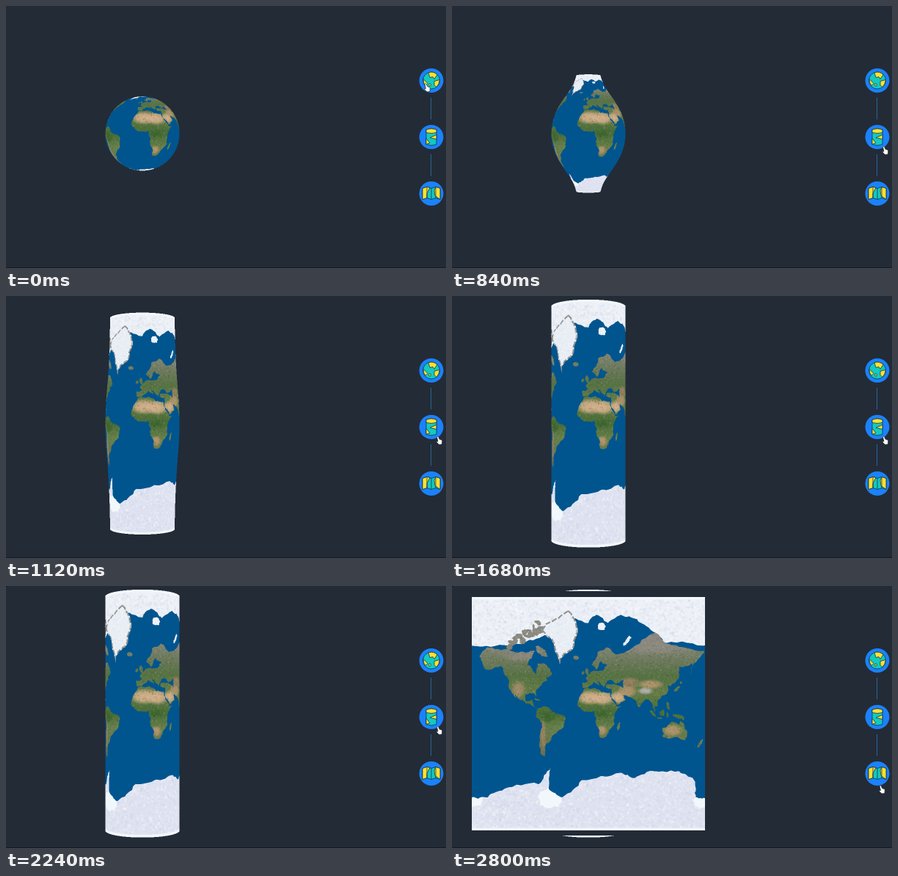
An HTML page with a canvas for the animation above (3.08 s loop, 600 px wide and 357 px high).

```html
<!DOCTYPE html>
<html lang="en">
<head>
<meta charset="utf-8">
<title>Globe, cylinder, map</title>
<style>
html, body { margin: 0; width: 100%; height: 100%; overflow: hidden; background: #232b37; }
canvas, svg { position: absolute; left: 0; top: 0; display: block; }
.ink { stroke: #15324a; stroke-width: .8; stroke-linejoin: round; }
.sea { fill: #14c9c0; }
.land { fill: #ffe12e; }
</style>
</head>
<body>
<canvas id="stage" width="600" height="357"></canvas>
<svg width="600" height="357">
  <rect y="356" width="600" height="1" fill="#141922"/>
  <rect id="dot" width="1" height="1"/>
  <path d="M579.5 125v29.5m0 47.5v29.5" stroke="#2a6595"/>
  <g class="ink" transform="translate(580 101.5)">
    <circle r="16.5" fill="#1a82fb" stroke="none"/>
    <circle class="sea" r="11.5"/>
    <path class="land" d="M-4-10.700Q3-13 8-8L4-2 2-5-2-4Z"/>
    <path class="land" d="M4 1 11.300-1Q11 5 7 9L4 6Z"/>
    <path class="land" d="M-11-2-5 4-8 7Q-11 4-11-2Z"/>
    <circle class="land" cx="-2" cy="6" r="1.5"/>
  </g>
  <g class="ink" transform="translate(580 178.5)">
    <circle r="16.5" fill="#1a82fb" stroke="none"/>
    <path class="sea" d="M-7-10V10Q0 13 7 10V-10Q0-13-7-10Z"/>
    <path class="land" d="M-7-10Q0-13 7-10V-6Q0-4-7-6Z"/>
    <path class="land" d="M7-3-2 1 7 3ZM-7 2-2 8-7 10Z"/>
  </g>
  <g class="ink" transform="translate(580 255.5)">
    <circle r="16.5" fill="#1a82fb" stroke="none"/>
    <path class="sea" d="M-12-7-6-9 0-7 6-9 12-7V8L6 6 0 8-6 6-12 8Z"/>
    <path class="land" d="M-12-7-6-9-2-8-6 0V6L-12 8Z"/>
    <path class="land" d="M12-7 6-9 4-4 5 3 12 8Z"/>
    <path fill="none" d="M-6-9V6M0-7V8M6-9V6"/>
  </g>
  <path id="hand" fill="#fff" stroke="#20242c" stroke-width=".7" stroke-linejoin="round"
    d="M2 1.600Q3.400 0 4.300 1.600L5.500 4.600 9.300 6 9 11.500 5 12 1 8 3.500 7.600Z"/>
</svg>
<script>
const STEP = 280, LOOP = 3080;
const T = 1272;                       // side of the Mercator texture
const R = 318 / (2 * Math.PI), CX = 186, CY = 173.8;
const CAM = 17;                       // camera distance in radii
const SS = 2;                         // supersampling
const BOX = { x: 26, y: 4, w: 320, h: 340 };
const { PI, sin, cos, tan, tanh, cosh, asin, asinh, abs, max, min, hypot } = Math;

let seed = 7;
const rand = () => (seed = (seed * 16807) % 2147483647) / 2147483647;

function makeCanvas(w, h) {
  const c = document.createElement('canvas');
  c.width = w;
  c.height = h;
  return c.getContext('2d', { willReadFrequently: true });
}

// ---- Map texture ----
const mapX = lon => (lon / 360 + .5) * T;
const mapY = lat => (.5 - asinh(tan(lat * PI / 180)) / (2 * PI)) * T;

// Fractal coast between two points
function coast(path, [ax, ay], [bx, by], depth) {
  if (!depth) return path.lineTo(bx, by);
  const len = hypot(bx - ax, by - ay) || 1;
  const k = (rand() - .5) * min(len * .34, 16) / len;
  const mid = [(ax + bx) / 2 + (ay - by) * k, (ay + by) / 2 + (bx - ax) * k];
  coast(path, [ax, ay], mid, depth - 1);
  coast(path, mid, [bx, by], depth - 1);
}

function ragged(pts) {
  const path = new Path2D();
  path.moveTo(...pts[0]);
  pts.forEach((p, i) => coast(path, p, pts[(i + 1) % pts.length], 3));
  return path;
}

// Outline from "lon,lat" pairs
const outline = text => ragged(text.split(' ').map(s => {
  const [lon, lat] = s.split(',').map(Number);
  return [mapX(lon), mapY(lat)];
}));

// Small island: tilted ellipse with a ragged edge, radii in degrees
function island(lon, lat, rx, ry, tilt) {
  const pts = [];
  for (let i = 0; i < 8; i++) {
    const a = i * PI / 4, k = T / 360 * (.8 + rand() * .4);
    const x = cos(a) * rx * k, y = sin(a) * ry * k;
    pts.push([mapX(lon) + x * cos(tilt) - y * sin(tilt), mapY(lat) + x * sin(tilt) + y * cos(tilt)]);
  }
  return ragged(pts);
}

function speckle(ctx, count, size, tones) {
  for (let i = 0; i < count; i++) {
    ctx.fillStyle = tones[i % tones.length];
    ctx.fillRect(rand() * T, rand() * T, 1 + rand() * size, 1 + rand() * size);
  }
}

function drawContinents(g) {
  const northAmerica = '-168,66 -156,71 -128,70 -96,68 -82,69 -94,60 -81,51 -78,61 -65,60 -56,52 -66,49 -61,45 -70,43 -81,31 -80,25 -84,30 -97,28 -96,19 -91,19 -87,21 -84,11 -78,8 -92,15 -106,21 -114,31 -110,23 -123,38 -124,48 -135,59 -158,56 -164,62';
  g.fill(outline(northAmerica));
  const southAmerica = '-77,8 -62,10 -50,0 -35,-7 -40,-22 -48,-27 -57,-37 -65,-42 -67,-55 -74,-52 -71,-20 -81,-5';
  g.fill(outline(southAmerica));
  const africa = '-6,36 10,37 20,31 33,31 43,11 51,12 40,-4 40,-16 28,-33 19,-35 12,-17 9,4 -8,4 -17,14 -10,30';
  g.fill(outline(africa));
  const europe = '-9,37 -9,43 -1,44 -4,48 8,55 23,55 29,60 21,61 24,65 17,61 13,56 5,60 14,68 28,71 42,67 60,69 66,50 48,43 40,43 36,46 29,45 24,37 19,41 13,45 17,39 9,44 -1,37';
  g.fill(outline(europe));
  const asia = '59,69 80,73 104,77 128,72 179,69 163,61 157,52 160,61 140,58 140,50 127,39 122,40 122,31 108,21 107,11 101,12 103,2 97,17 90,22 80,11 77,8 72,21 57,27 49,30 55,25 58,20 44,13 35,28 36,36 27,37 28,41 49,39 54,37 54,44';
  g.fill(outline(asia));
  const australia = '114,-22 130,-12 140,-17 142,-11 153,-27 149,-38 138,-34 115,-34';
  g.fill(outline(australia));
}

function drawIslands(g) {
  const put = (...spec) => g.fill(island(...spec));
  put(47, -19, 2, 7, .25);      // Madagascar
  put(-2, 54, 2.5, 6, -.3);     // Britain
  put(-8, 53, 2, 3, 0);
  put(-19, 65, 5, 3, 0);        // Iceland
  put(137, 36, 7, 2, -.7);      // Japan
  put(143, 43, 2, 2, 0);
  put(100, 0, 7, 2, .8);        // Sumatra
  put(110, -7, 5, 1, .1);
  put(114, 1, 4, 5, .4);        // Borneo
  put(122, -2, 2, 4, 0);
  put(140, -5, 10, 3, .4);      // New Guinea
  put(123, 12, 2, 7, -.3);
  put(172, -42, 2, 8, .6);      // New Zealand
  put(-79, 21, 5, 1, .3);
  put(-73, 69, 13, 5, .7);      // Baffin
  // Arctic archipelago
  for (let i = 0; i < 16; i++)
    put(-122 + i * 3.4, 71 + rand() * 4 + i * .4, 3 + rand() * 4, 2 + rand() * 4, rand() * 3);
}

// Soft climate patch, half sizes in degrees
function climate(g, lon, lat, rx, ry, tone) {
  const fade = g.createRadialGradient(0, 0, 0, 0, 0, 1);
  fade.addColorStop(0, tone);
  fade.addColorStop(.55, tone + 'd0');
  fade.addColorStop(1, tone + '00');
  g.save();
  g.translate(mapX(lon), mapY(lat));
  g.scale(rx * T / 360, ry * T / 360 / cos(lat * PI / 180));
  g.fillStyle = fade;
  g.fillRect(-1, -1, 2, 2);
  g.restore();
}

function drawLand() {
  const g = makeCanvas(T, T);
  const base = g.createLinearGradient(0, 0, 0, T);
  const band = (lat, tone) => base.addColorStop(mapY(lat) / T, tone);
  band(74, '#8c8a82');
  band(60, '#687857');
  band(50, '#567344');
  band(30, '#647c48');
  band(0, '#486d37');
  band(-20, '#66804a');
  band(-50, '#6d7050');
  g.fillStyle = base;
  drawContinents(g);
  drawIslands(g);
  g.globalCompositeOperation = 'source-atop';
  const sand = '#d7b28e', dry = '#b5966f', scrub = '#97805f', grey = '#8d8a81', lush = '#3d662f';
  climate(g, 100, 71, 65, 4, grey);
  climate(g, -100, 67, 38, 5, grey);
  climate(g, 3, 24, 23, 11, sand);
  climate(g, 23, 23, 19, 11, sand);
  climate(g, 46, 24, 14, 10, sand);
  climate(g, 60, 33, 16, 10, dry);
  climate(g, 63, 43, 18, 7, scrub);
  climate(g, 96, 41, 22, 6, dry);
  climate(g, 88, 33, 13, 5, '#b5b4b2');
  climate(g, -108, 35, 12, 12, '#a38c69');
  climate(g, -70, -30, 5, 24, scrub);
  climate(g, -62, -5, 14, 10, lush);
  climate(g, 20, 0, 13, 7, lush);
  climate(g, 21, -25, 9, 8, dry);
  climate(g, 130, -25, 17, 9, dry);
  speckle(g, 26000, 7, ['#20401c30', '#d8c8a028', '#5a4a3428']);
  return g.canvas;
}

function drawIce() {
  const g = makeCanvas(T, T);
  const arctic = '-185,86 -185,72 -130,72 -100,73 -62,77 -40,82 0,80 12,82 30,80 50,82 75,81 104,77 120,73 185,72 185,86';
  g.fillStyle = '#edf1f7';
  g.fill(outline(arctic));
  g.fill(island(60, 74, 10, 3, -.9));
  g.fill(island(20, 79, 6, 6, 0));
  const antarctica = '-185,-78 -155,-78 -130,-75 -77,-73 -58,-63.5 -61,-75 -40,-78 -10,-71 50,-67 70,-70 90,-66.5 140,-66 163,-71 166,-78 185,-78 185,-86 -185,-86';
  g.fillStyle = '#dfe3f1';
  g.fill(outline(antarctica));
  g.globalCompositeOperation = 'source-atop';
  speckle(g, 14000, 16, ['#ffffff48', '#b9c3da28', '#cfd6e830']);
  g.fillStyle = '#f1f7fb';
  for (const lon of [-180, -60, 180]) g.fill(island(lon, -78.5, 20, 15, 0));
  g.fillRect(0, 0, T, 14);
  g.fillRect(0, T - 14, T, 14);
  return g.canvas;
}

function drawMap() {
  const g = makeCanvas(T, T);
  g.fillStyle = '#00558f';
  g.fillRect(0, 0, T, T);
  g.drawImage(drawIce(), 0, 0);
  g.drawImage(drawLand(), 0, 0);
  const greenland = outline('-73,78 -58,75 -44,60 -41,65 -22,71 -18,80 -30,83 -65,80');
  g.fillStyle = '#e9eef5';
  g.fill(greenland);
  g.clip(greenland);
  g.strokeStyle = '#8d908f';
  g.lineWidth = 16;
  g.setLineDash([30, 9]);
  g.stroke(greenland);
  speckle(g, 9000, 10, ['#ffffff60', '#b9c3da30']);
  return new Uint32Array(g.getImageData(0, 0, T, T).data.buffer);
}

// ---- Projection: rise 0..1 turns globe into cylinder, roll 0..1 flattens it ----
function mercatorAt(y, rise) {
  if (rise === 1) return y;
  let lo = -4, hi = 4;
  for (let i = 0; i < 13; i++) {
    const m = (lo + hi) / 2;
    if ((1 - rise) * tanh(m) + rise * m < y) lo = m; else hi = m;
  }
  return (lo + hi) / 2;
}

function texelAt(sx, sy, rise, roll) {
  const limit = rise ? PI : 3.95;
  let p = 1, lon, m, side = 0;
  for (let i = 0; i < 3; i++) {
    const x = sx / p;
    m = mercatorAt(sy / p, rise);
    const r = (1 - rise) / cosh(m) + rise;
    if (roll) {
      lon = x;
      for (let j = 0; j < 4; j++)
        lon -= ((1 - roll) * sin(lon) + roll * lon - x) / ((1 - roll) * cos(lon) + roll);
    } else {
      side = x / r;
      lon = asin(max(-1, min(1, side)));
    }
    p = CAM / (CAM - (1 - roll) * r * cos(lon));
  }
  if (abs(side) > 1 || abs(m) > limit || abs(lon) > PI) return -1;
  const col = min(T - 1, (lon / (2 * PI) + .5) * T | 0);
  const row = max(0, min(T - 1, (.5 - m / (2 * PI)) * T | 0));
  return row * T + col;
}

function project(map, rise, roll) {
  const w = BOX.w * SS, h = BOX.h * SS;
  const g = makeCanvas(w, h);
  const img = g.createImageData(w, h);
  const out = new Uint32Array(img.data.buffer);
  const half = roll ? 3.2 : 1.02;
  const tall = 1 + rise * 2.4;
  for (let y = 0; y < h; y++) {
    const sy = (CY - BOX.y - (y + .5) / SS) / R;
    if (abs(sy) > tall) continue;
    for (let x = 0; x < w; x++) {
      const sx = ((x + .5) / SS + BOX.x - CX) / R;
      if (abs(sx) > half) continue;
      const k = texelAt(sx, sy, rise, roll);
      if (k >= 0) out[y * w + x] = map[k];
    }
  }
  g.putImageData(img, 0, 0);
  return g.canvas;
}

// ---- Playback ----
const map = drawMap();
const globe = project(map, 0, 0);
const bulge = project(map, .264, 0);
const barrel = project(map, .857, 0);
const cylinder = project(map, 1, 0);
const sheet = project(map, 1, .905);
const flat = project(map, 1, 1);
const POSES = [globe, globe, globe, bulge, barrel, cylinder, cylinder, cylinder, cylinder, sheet, flat];

const ctx = document.getElementById('stage').getContext('2d');
const hand = document.getElementById('hand');
const dot = document.getElementById('dot');
ctx.imageSmoothingQuality = 'high';

const paint = pic => ctx.drawImage(pic, BOX.x, BOX.y, BOX.w, BOX.h);

function show(step) {
  ctx.clearRect(0, 0, 600, 357);
  if (step > 8) {
    // slivers of the cylinder stay above and below the sheet
    paint(cylinder);
    ctx.clearRect(0, 7, 600, 333);
  }
  paint(POSES[step]);
  const spot = step < 1 ? '569 105' : step < 9 ? '585.5 190.5' : '581 271';
  hand.setAttribute('transform', `translate(${spot})`);
  dot.setAttribute('visibility', step < 8 ? 'hidden' : 'visible');
}

let start, shown = 0;
function tick(now) {
  start ??= now;
  const step = Math.floor((now - start) % LOOP / STEP);
  if (step !== shown) show(shown = step);
  requestAnimationFrame(tick);
}
show(0);
requestAnimationFrame(tick);
</script>
</body>
</html>
```
